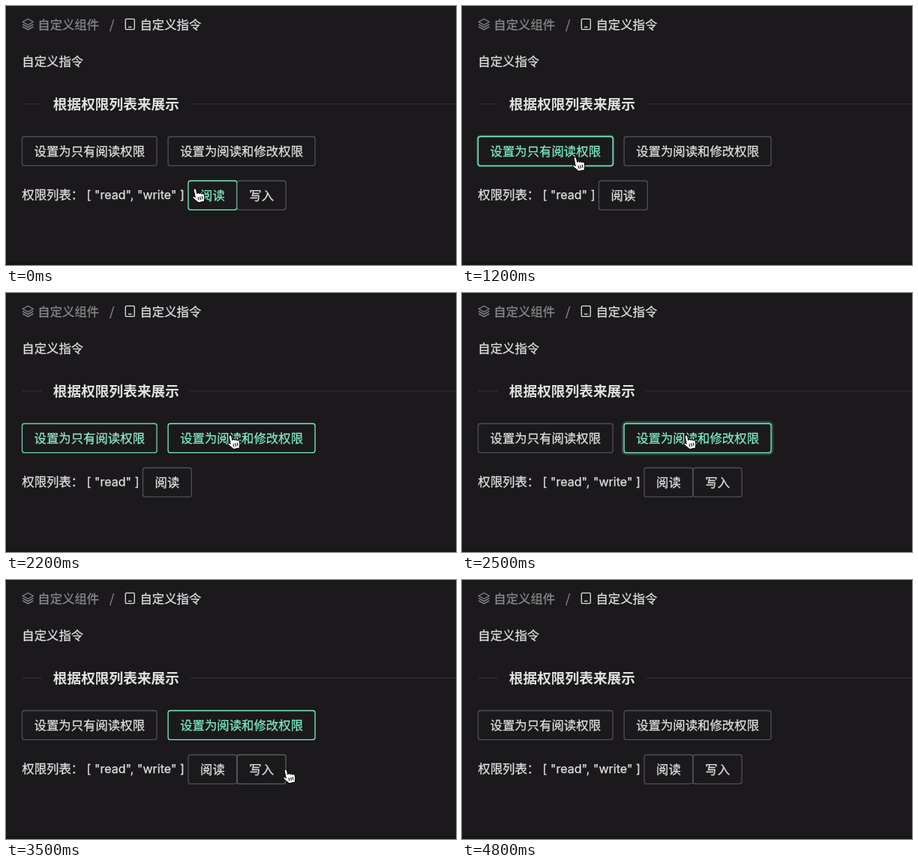
An HTML page for the animation above (5.1 s loop, 600 px wide and 346 px high).

```html
<!DOCTYPE html>
<html lang="zh-CN">
<head>
<meta charset="utf-8">
<title>自定义指令</title>
<style>
html, body { margin: 0; width: 100%; height: 100%; overflow: hidden; background: #1b191c; }
svg { display: block; width: 600px; height: 346px; }
text {
  font: 16.4px "Noto Sans CJK SC", "Noto Sans CJK", sans-serif;
  color: #e2e1e2; fill: currentColor; stroke: currentColor; stroke-width: .25;
}
.dim { color: #8b8a8c; }
.head { font-size: 18.7px; font-weight: 700; stroke: none; }
.code { font: 16.1px Inter, Roboto, sans-serif; white-space: pre; }
.btn text { text-anchor: middle; }
.btn rect, .line, .icon { fill: none; }
.line { stroke: #302f31; stroke-width: 1.2; }
.icon { stroke-width: 1.3; stroke-linejoin: round; }
</style>
</head>
<body>
<svg viewBox="0 0 600 346">
  <rect width="600" height="346" fill="#1b191c"/>
  <rect y="341.5" width="600" height="4.5" fill="#161517"/>
  <path class="icon" stroke="#8b8a8c" d="M29.3 17.2L36.4 21.2 29.3 25.2 22.2 21.2ZM22.2 24.4L29.3 28.4 36.4 24.4M22.2 27.6L29.3 31.6 36.4 27.6"/>
  <text class="dim" x="42.3" y="30.8">自定义组件</text>
  <text class="dim" x="138" y="30.8">/</text>
  <g class="icon" stroke="#e2e1e2">
    <rect x="159.3" y="17.3" width="12" height="14" rx="1.3"/>
    <path d="M163 28.2H167.6"/>
  </g>
  <text x="178.4" y="30.8">自定义指令</text>
  <text x="21.3" y="80">自定义指令</text>
  <path class="line" d="M21 130.8H48M245.5 130.8H600"/>
  <text class="head" x="62.8" y="138">根据权限列表来展示</text>
  <text x="21.3" y="258.4">权限列表：</text>
  <text class="code" id="list" x="107.5" y="258.4"></text>
  <g id="buttons"></g>
  <g id="cursor" stroke-linejoin="round">
    <g id="hand" transform="translate(.6 -1) rotate(-12) scale(1.04)">
      <path fill="#fff" stroke="#000" d="M-1.7 11V1.5C-1.7-.6 1.6-.6 1.6 1.5V7C1.9 5.6 4.6 5.8 4.6 7.6 5 6.4 7.4 6.8 7.4 8.6 8 7.6 10 8 10.2 9.8V13C10.2 15 8.8 16 8.8 18.6H.6C.2 17-3 14.5-4.4 11.8-6 9-3.6 8-1.7 11Z"/>
      <path stroke="#000" d="M2 11.5V15.5M4.5 11.5V15.5M7 11.5V15.5"/>
    </g>
    <path id="arrow" fill="#000" stroke="#fff" d="M0 0V15.5L3.6 12.2 6 17.8 8.4 16.8 6 11.3H10.8Z"/>
  </g>
</svg>
<script>
const LOOP = 5100, STEP = 100, FADE = 300, WAVE = 600;
const EM = 16.4, PAD = 32, H = 38.8;
const SET_READ = 1100, SET_BOTH = 2320, GONE = 4800;
const $ = id => document.getElementById(id);

// each button is lit from `on` to `off` by hover or focus
const rows = [
  { x: 21.5, y: 174.5, gap: 15, items: [
    { label: '设置为只有阅读权限', on: 130, off: 2120, click: SET_READ },
    { label: '设置为阅读和修改权限', on: 1590, off: 4050, click: SET_BOTH }
  ] },
  { x: 243, y: 233.5, gap: .5, items: [
    { label: '阅读', on: -FADE, off: 40 },
    { label: '写入', on: 3440, off: 3540 }
  ] }
];

// pointer moves: from rest, glide to x, y between two times
const origin = [251, 245];
const moves = [
  { from: 0, to: 400, x: 150, y: 203 },
  { from: 1300, to: 1800, x: 298, y: 191 },
  { from: 2650, to: 3000, x: 278, y: 249 },
  { from: 3200, to: 3500, x: 372, y: 254 },
  { from: 3500, to: 3800, x: 392, y: 332 },
  { from: 4450, to: GONE, x: 650, y: 20 }
];

const clamp = v => Math.min(1, Math.max(0, v));
const smooth = v => { v = clamp(v); return v * v * (3 - 2 * v); };
const easeOut = v => 1 - (1 - clamp(v)) ** 2.5;

function set(el, attrs) {
  for (const k in attrs) el.setAttribute(k, attrs[k]);
}
function add(parent, tag, attrs) {
  const el = document.createElementNS('http://www.w3.org/2000/svg', tag);
  set(el, attrs);
  return parent.appendChild(el);
}
const mix = (a, b, k) => `rgb(${a.map((v, i) => Math.round(v + (b[i] - v) * k))})`;
const GREEN = [125, 238, 198], BORDER = [80, 79, 81], INK = [226, 225, 226];

const buttons = [];
for (const row of rows) {
  let x = row.x;
  for (const item of row.items) {
    const b = { ...item, x, y: row.y, w: item.label.length * EM + PAD };
    b.g = add($('buttons'), 'g', { class: 'btn' });
    if (b.click) b.wave = add(b.g, 'rect', { stroke: '#63e2b7' });
    b.box = add(b.g, 'rect', { x, y: b.y, width: b.w, height: H, rx: 3, 'stroke-width': 1.3 });
    b.text = add(b.g, 'text', { x: x + b.w / 2, y: b.y + 25.6 });
    b.text.textContent = b.label;
    buttons.push(b);
    x += b.w + row.gap;
  }
}
const [, , read, write] = buttons;

function drawButton(b, t) {
  const lit = smooth((t - b.on) / FADE) - smooth((t - b.off) / FADE);
  b.box.setAttribute('stroke', mix(BORDER, GREEN, lit));
  b.text.style.color = mix(INK, GREEN, lit);
  if (!b.wave) return;
  const p = (t - b.click) / WAVE;
  const e = easeOut(p), s = 5.3 * e, m = s / 2;
  set(b.wave, {
    x: b.x - m, y: b.y - m, width: b.w + s, height: H + s, rx: 3 + m,
    'stroke-width': s, opacity: .6 * (1 - e)
  });
}

function pointer(t) {
  let [x, y] = origin;
  for (const m of moves) {
    const k = smooth((t - m.from) / (m.to - m.from));
    x += (m.x - x) * k;
    y += (m.y - y) * k;
  }
  return [x, y];
}

function draw(t) {
  const readOnly = t >= SET_READ && t < SET_BOTH;
  $('list').textContent = readOnly ? '[ "read" ]' : '[ "read", "write" ]';
  set(read.g, { transform: `translate(${readOnly ? -60.5 : 0} 0)` });
  write.g.style.display = readOnly ? 'none' : '';
  buttons.forEach(b => drawButton(b, t));

  const [x, y] = pointer(t);
  const over = buttons.some(b => x > b.x && x < b.x + b.w && y > b.y && y < b.y + H);
  set($('cursor'), { transform: `translate(${x} ${y})` });
  $('cursor').style.display = t < GONE ? '' : 'none';
  $('hand').style.display = over ? '' : 'none';
  $('arrow').style.display = over ? 'none' : '';
}

const start = performance.now();
function tick() {
  const t = (performance.now() - start) % LOOP;
  draw(Math.floor(t / STEP) * STEP);
  requestAnimationFrame(tick);
}
tick();
</script>
</body>
</html>
```
